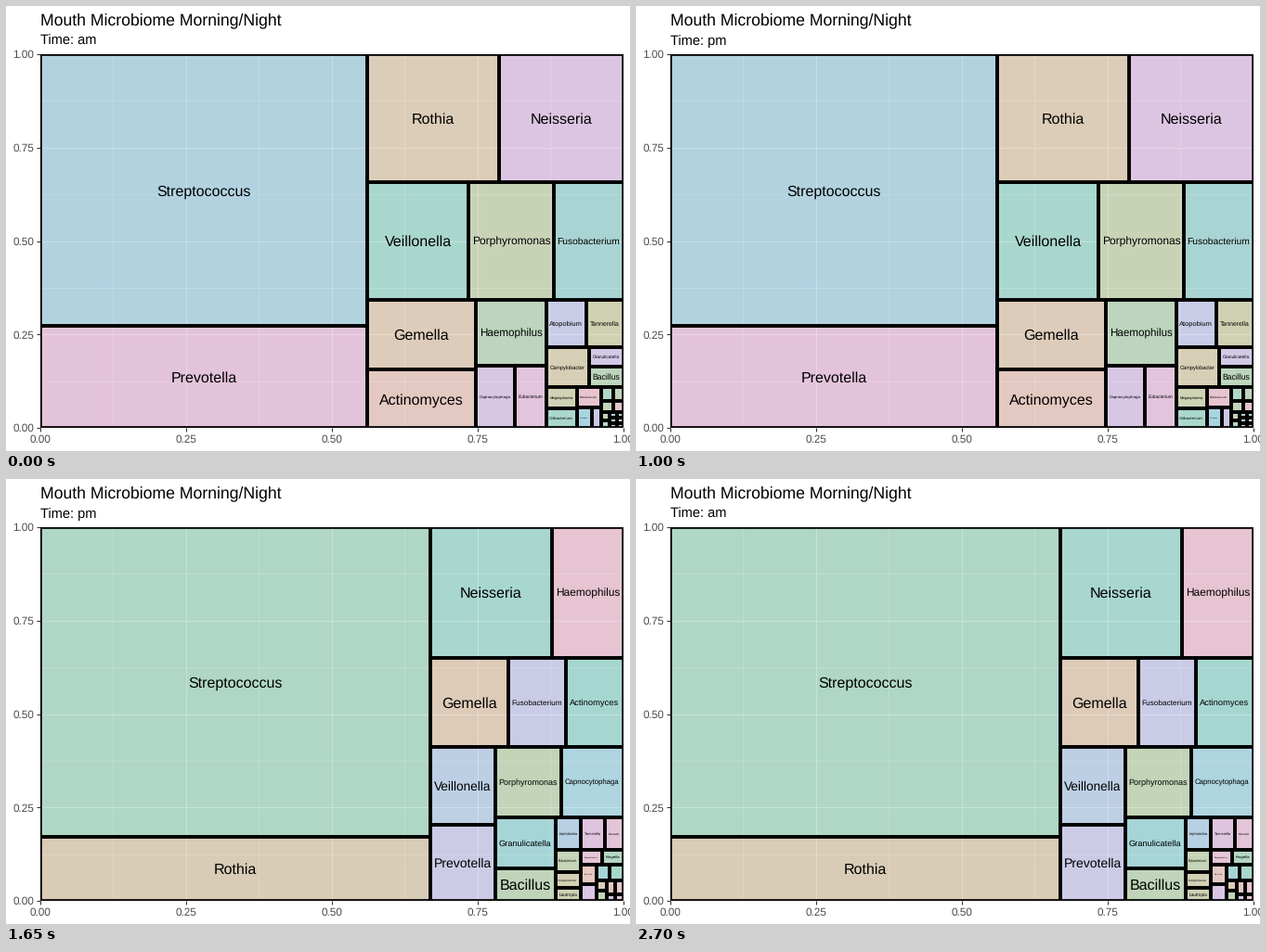
A matplotlib script that plays this animation: 672x480 px, repeating every 3 s.

```python
import matplotlib.pyplot as plt
from matplotlib.animation import FuncAnimation
from matplotlib.patches import Rectangle
from matplotlib.textpath import TextPath

plt.rcParams["font.family"] = "Liberation Sans"
plt.rcParams["text.hinting"] = "none"

W, H, DPI = 672, 480, 96
PT = 72 / DPI                     # points per pixel
L, R, T, B = 36.7, 664.6, 52, 455
CAP = 0.716                       # cap height in ems
PAD = 3.8
LABEL = 16                        # largest tile label, px
BORDER = 3.6

# Strips: direction, the two fixed edges, the cuts along the strip, its tiles
MORNING = [
    ("col", L, 389, [T, 345, B], "Streptococcus:b2d2e0 Prevotella:e3c3da"),
    ("row", T, 190, [389, 531, R], "Rothia:dccdb8 Neisseria:dcc5e2"),
    ("row", 190, 316.5, [389, 498, 590, R],
     "Veillonella:a9d7cd Porphyromonas:c8d3b6 Fusobacterium:a8d5d3"),
    ("col", 389, 506, [316.5, 392, B], "Gemella:ddccba Actinomyces:e3c9c1"),
    ("col", 506, 581.5, [316.5, 388], "Haemophilus:bcd5bc"),
    ("row", 388, B, [506, 547.5, 581.5],
     "Capnocytophaga:d7c7e5 Eubacterium:e2c4dc"),
    ("row", 316.5, 367.5, [581.5, 625, R], "Atopobium:c9cce7 Tannerella:cfd1b2"),
    ("row", 367.5, 411, [581.5, 627.5], "Campylobacter:d7cfb5"),
    ("col", 627.5, R, [367.5, 389, 411], "Granulicatella:d2c9e7 Bacillus:bcd5bc"),
    ("col", 581.5, 614.5, [411, 434, B], "Megasphaera:cfd2b4 Oribacterium:a9d7cb"),
    ("row", 411, 432.5, [614.5, 640.5], "Bifidobacterium:e7c5cf"),
    ("row", 432.5, B, [614.5, 631, 640.5], "Lautropia:a9d5e1 :ccc9e6"),
    ("row", 411, 425.5, [640.5, 654, R], ":b0d7c5 :c0d4ba"),
    ("row", 425.5, 438, [640.5, 654, R], ":c3d4b8 :e6c5cc"),
    ("col", 640.5, 649.5, [438, 446.5, B], ":c8d3b6 :b5d6c2"),
    ("col", 649.5, 658, [438, 444, 449.5, B], ":b4d2e2 :a8d5d3 :c3cee5"),
    ("col", 658, R, [438, 444, 449.5, B], ":a9d7cd :dccdb8 :bcd5bc"),
]
NIGHT = [
    ("col", L, 457, [T, 386, B], "Streptococcus:b0d7c5 Rothia:d8ccb6"),
    ("row", T, 193, [457, 588, R], "Neisseria:a8d7cf Haemophilus:e6c4d2"),
    ("row", 193, 289, [457, 541, 603, R],
     "Gemella:ddcbb8 Fusobacterium:cacce7 Actinomyces:a6d6d0"),
    ("col", 457, 527, [289, 373, B], "Veillonella:bdcfe4 Prevotella:cccbe6"),
    ("row", 289, 365, [527, 598, R], "Porphyromonas:c3d4b8 Capnocytophaga:aed5e0"),
    ("col", 527, 591.5, [365, 419.5, B], "Granulicatella:a6d5d7 Bacillus:bfd4b9"),
    ("row", 365, 400, [591.5, 619, 645, R],
     "Leptotrichia:b8d0e3 Tannerella:dfc4df Olsenella:e4c4d9"),
    ("col", 591.5, 619, [400, 424, 441, B],
     "Eubacterium:c5d4b7 Campylobacter:d3d0b4 Lautropia:cdd2b4"),
    ("row", 400, 416, [619, 641.5, R], "Megasphaera:e5c4d6 Kingella:b3d6c2"),
    ("col", 619, 635.5, [416, 437, B], "Catonella:e3c9c1 :d9c6e4"),
    ("row", 416, 433, [635.5, 650, R], ":a6d5d7 :a8d7cb"),
    ("col", 635.5, 647, [433, 444, B], ":dbcdb7 :c3d4b8"),
    ("row", 433, 447.5, [647, 656, R], ":e3c8c3 :e6c5cc"),
    ("row", 447.5, B, [647, 656, R], ":d2c9e7 :e2c4dc"),
]

fig = plt.figure(figsize=(W / DPI, H / DPI), dpi=DPI, facecolor="white")
ax = fig.add_axes([0, 0, 1, 1])
ax.set(xlim=(0, W), ylim=(H, 0))
ax.axis("off")
panel = Rectangle((L, T), R - L, B - T, fc="none", ec="none")
ax.add_patch(panel)


def write(x, base, s, px, color="black", ha="left"):
    return ax.text(x, base, s, fontsize=px * PT, color=color, ha=ha,
                   va="baseline", zorder=5)


def line(xs, ys, px, color, **kw):
    ax.plot(xs, ys, color=color, lw=px * PT, solid_capstyle="butt", **kw)


def fit(name, w, h):
    ems = TextPath((0, 0), name, size=100).get_extents().width / 100 + 0.1
    return min(LABEL, (w - 2 * PAD) / ems, (h - 2 * PAD) / CAP)


def treemap(strips):
    parts = []
    for way, lo, hi, cuts, tiles in strips:
        for a, b, tile in zip(cuts, cuts[1:], tiles.split()):
            name, color = tile.split(":")
            x0, x1, y0, y1 = (a, b, lo, hi) if way == "row" else (lo, hi, a, b)
            w, h = x1 - x0, y1 - y0
            fill = Rectangle((x0, y0), w, h, fc="#" + color, ec="none", zorder=1)
            edge = Rectangle((x0, y0), w, h, fc="none", ec="black",
                             lw=BORDER * PT, joinstyle="miter", zorder=3)
            for p in (fill, edge):
                ax.add_patch(p)
                p.set_clip_path(panel)
                parts.append(p)
            if name:
                px = fit(name, w, h)
                parts.append(write((x0 + x1) / 2, (y0 + y1) / 2 + CAP * px / 2,
                                   name, px, ha="center"))
    return parts


def axes_and_grid():
    for i in range(9):
        x, y = L + (R - L) * i / 8, B - (B - T) * i / 8
        px = 0.55 if i % 2 else 1.07
        for xs, ys in (([x, x], [T, B]), ([L, R], [y, y])):
            line(xs, ys, px, "white", alpha=0.3, zorder=2)
        if i % 2 == 0:
            s = f"{i / 8:.2f}"
            line([x, x], [B, B + 3.67], 1.07, "#333333")
            line([L - 3.67, L], [y, y], 1.07, "#333333")
            write(x, B + 15.4, s, 11.73, "#4d4d4d", "center")
            write(L - 6.6, y + 4.2, s, 11.73, "#4d4d4d", "right")


axes_and_grid()
write(L, 20.2, "Mouth Microbiome Morning/Night", 17.6)
subtitle = write(L, 42.2, "", 14.67)
morning, night = treemap(MORNING), treemap(NIGHT)

STEP = 250


def update(i):
    t = i * STEP
    subtitle.set_text("Time: " + ("pm" if 1000 <= t < 2250 else "am"))
    for part in morning:
        part.set_visible(t < 1250)
    for part in night:
        part.set_visible(t >= 1250)
    return [subtitle, *morning, *night]


anim = FuncAnimation(fig, update, frames=3000 // STEP, interval=STEP,
                     repeat=True, repeat_delay=0, blit=False)
plt.show()
```
